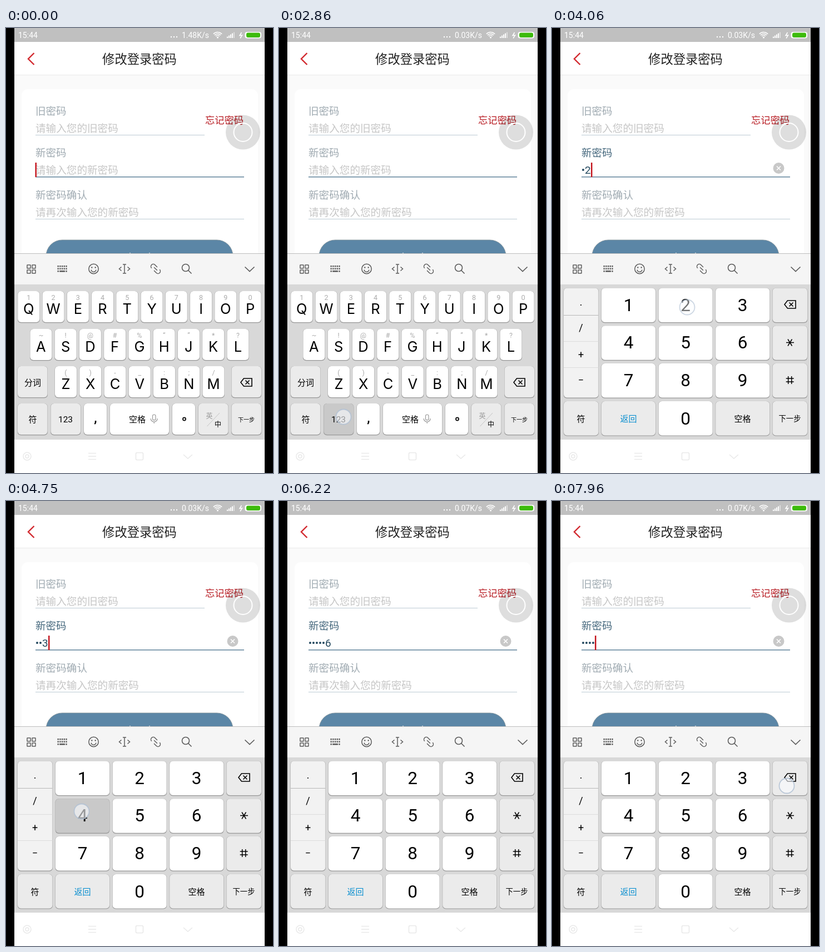
An HTML page with a canvas that plays this animation: 480 by 800 pixels, repeating every 8 s.

```html
<!DOCTYPE html>
<html lang="zh-CN">
<head>
<meta charset="utf-8">
<style>
html, body { margin: 0; width: 100%; height: 100%; overflow: hidden; background: #000; }
canvas { display: block; width: 480px; height: 800px; }
</style>
</head>
<body>
<canvas id="stage" width="480" height="800"></canvas>
<script>
const ctx = document.getElementById('stage').getContext('2d');
const LOOP = 8000;
const FONT = 'Roboto, "Noto Sans CJK SC", sans-serif';
const KEY_FONT = 'Inter, sans-serif';

// Finger taps: the key reacts on release, then the touch dot fades until end.
const TAPS = [
  { key: '123', start: 2740, release: 2935, end: 3090, x: 116, y: 699 },
  { key: '1', start: 3325, release: 3520, end: 3640, x: 141, y: 500 },
  { key: '2', start: 3830, release: 4020, end: 4130, x: 243, y: 502 },
  { key: '3', start: 4370, release: 4560, end: 4660, x: 340, y: 503 },
  { key: '4', start: 4670, release: 4870, end: 4970, x: 136, y: 558 },
  { key: '5', start: 4900, release: 5070, end: 5260, x: 244, y: 576 },
  { key: '6', start: 5590, release: 5720, end: 5880, x: 321, y: 577 },
  { key: 'del', start: 7185, release: 7370, end: 7570, x: 421, y: 508 },
  { key: 'del', start: 7810, release: 7950, end: 8100, x: 422, y: 512 }
];
const PRESS_DELAY = 40, MASK_DELAY = 1505;
const CARET_FLIPS = [430, 930, 1430, 1930, 2430, 2930, 3430, 3520, 4520, 4560,
  5570, 5720, 6220, 6690, 7225, 7370, 7870, 7950];
const GREY = '#ebebeb', DOWN = '#c9c9c9', INK = '#000';

function rect(x, y, w, h, color) {
  ctx.fillStyle = color;
  ctx.fillRect(x, y, w, h);
}

function round(x, y, w, h, r, fill, stroke, width = 1) {
  ctx.beginPath();
  ctx.roundRect(x, y, w, h, r);
  paint(fill, stroke, width);
}

function circle(x, y, r, fill, stroke, width = 1) {
  ctx.beginPath();
  ctx.arc(x, y, r, 0, Math.PI * 2);
  paint(fill, stroke, width);
}

function paint(fill, stroke, width) {
  if (fill) { ctx.fillStyle = fill; ctx.fill(); }
  if (stroke) { ctx.strokeStyle = stroke; ctx.lineWidth = width; ctx.stroke(); }
}

function line(color, width, ...points) {
  ctx.beginPath();
  for (let i = 0; i < points.length; i += 2) ctx.lineTo(points[i], points[i + 1]);
  paint(null, color, width);
}

function arc(x, y, r, from, to, color, width) {
  ctx.beginPath();
  ctx.arc(x, y, r, from * Math.PI, to * Math.PI);
  paint(null, color, width);
}

// Text is placed by the vertical middle of its glyphs.
function text(str, x, cy, size, color, align = 'center', weight = 400, font = FONT) {
  const lift = /[\u4e00-\u9fff]/.test(str) ? 0.38 : 0.355;
  ctx.font = `${weight} ${size}px ${font}`;
  ctx.textAlign = align;
  ctx.fillStyle = color;
  ctx.fillText(str, x, cy + size * lift);
}

function passwordAt(t) {
  let count = 0, last = null;
  for (const tap of TAPS) {
    if (t < tap.release) break;
    if (tap.key === 'del') { count--; last = null; }
    else if (tap.key !== '123') { count++; last = tap; }
  }
  const shown = last && t < last.release + MASK_DELAY ? last.key : '';
  return { count, shown, dots: count - shown.length };
}

function drawStatusBar(t) {
  rect(15, 0, 450, 25, '#c0c0c0');
  text('15:44', 22, 13, 14, '#fff', 'left');
  const speed = t < 1970 ? '1.48' : t < 5950 ? '0.03' : '0.07';
  text(speed + 'K/s', 365, 13, 14, '#fff', 'right');
  for (let i = 0; i < 3; i++) circle(297 + i * 5, 16, 1.2, '#fff');
  circle(380.5, 17, 1.6, '#fff');
  for (const r of [4.5, 7.5, 10.5]) arc(380.5, 18, r, 1.24, 1.76, '#fff', 1.6);
  for (let i = 0; i < 5; i++) {
    const h = 2.5 + i * 2;
    rect(397 + i * 3, 18 - h, 2, h, i < 4 ? '#fff' : '#ddd');
  }
  line('#fff', 1.5, 423.5, 8, 420, 13.5, 424.5, 13, 421, 18.5);
  round(429.5, 7, 29.5, 11.5, 4, '#fff');
  round(432, 8.5, 25, 8.5, 3, '#3dbb0b');
}

function drawForm(t) {
  rect(15, 25, 450, 60, '#fff');
  rect(15, 84, 450, 1, '#e8e8e8');
  rect(15, 85, 450, 320, '#fafafa');
  line('#d2282e', 2.4, 50.5, 45, 40, 55.5, 50.5, 66);
  text('修改登录密码', 240, 56, 22.3, '#222');
  round(28, 110, 425, 310, 11, '#fff');

  const { count, shown, dots } = passwordAt(t);
  const label = '#a0abb2', hint = '#c6c6c6', ink = '#24495f';
  text('旧密码', 53, 148.5, 18.5, label, 'left');
  text('请输入您的旧密码', 53, 180, 18.6, hint, 'left');
  rect(53, 192, 304, 1, '#bccbd4');
  text('忘记密码', 358, 165, 17.3, '#b71a21', 'left');

  text('新密码', 53, 224, 18.5, count ? '#47697e' : label, 'left');
  rect(53, 267, 375, 1.5, '#5f8299');
  if (count) {
    for (let i = 0; i < dots; i++) circle(56 + i * 6, 255, 2, ink);
    text(shown, 53 + dots * 6, 255.5, 19, ink, 'left');
    circle(407.5, 252, 10, '#c8c8c8');
    line('#fff', 1.6, 404, 248.5, 411, 255.5);
    line('#fff', 1.6, 411, 248.5, 404, 255.5);
  } else {
    text('请输入您的新密码', 53, 255, 18.6, hint, 'left');
  }
  const flips = CARET_FLIPS.filter(f => t >= f).length;
  if (flips % 2 === 0) {
    const x = 52.5 + dots * 6 + shown.length * 11 + (count ? 0.5 : 0);
    rect(x, 242, 2.5, 26, '#c4161f');
  }

  text('新密码确认', 53, 299.5, 18.6, label, 'left');
  text('请再次输入您的新密码', 53, 330.5, 18.6, hint, 'left');
  rect(53, 343, 375, 1, '#bccbd4');
  round(72, 381, 336, 60, 29, '#5b86a6', '#8b979b', 0.8);
  rect(222, 404, 2, 1, '#d5e0e8');
  rect(257, 404, 2, 1, '#d5e0e8');

  circle(426, 187.5, 31, 'rgba(0,0,0,0.13)');
  circle(426, 187.5, 16.5, null, '#fff', 2);
}

function drawToolbar() {
  const c = '#5c5c5c';
  rect(15, 405, 450, 56, '#f5f5f5');
  rect(15, 405, 450, 1, '#bdbdbd');
  for (const x of [38, 47]) for (const y of [426, 435]) round(x, y, 6, 6, 0.5, null, c, 1.5);
  for (let i = 0; i < 5; i++) {
    rect(92.5 + i * 3.7, 427, 2.4, 2.6, c);
    rect(92.5 + i * 3.7, 431.5, 2.4, 2.6, c);
  }
  rect(92.5, 436, 2.4, 2.6, c);
  rect(96.2, 436, 9.8, 2.6, c);
  rect(107.3, 436, 2.4, 2.6, c);
  circle(157.5, 433, 8.7, null, c, 1.5);
  circle(154.3, 430.5, 1.2, c);
  circle(160.7, 430.5, 1.2, c);
  arc(157.5, 434, 4.5, 0.05, 0.95, c, 1.4);
  line(c, 1.5, 213, 425, 213, 441);
  line(c, 1.5, 210, 425, 216, 425);
  line(c, 1.5, 210, 441, 216, 441);
  line(c, 1.5, 207.5, 429.5, 203.5, 433, 207.5, 436.5);
  line(c, 1.5, 218.5, 429.5, 222.5, 433, 218.5, 436.5);
  ctx.save();
  ctx.translate(269, 433);
  ctx.rotate(Math.PI / 4);
  line(c, 1.5, -4, 0, 4, 0);
  for (let side = 0; side < 2; side++) {
    ctx.beginPath();
    ctx.arc(-6, 0, 4.2, Math.PI / 2, Math.PI * 1.5);
    ctx.lineTo(0, -4.2);
    paint(null, c, 1.5);
    ctx.rotate(Math.PI);
  }
  ctx.restore();
  circle(323, 431, 6.5, null, c, 1.6);
  line(c, 1.6, 327.5, 435.5, 333.5, 441.5);
  line(c, 1.7, 429.5, 429.5, 438, 437.5, 446.5, 429.5);
}

function key(x, y, w, h, color) {
  round(x - 0.4, y, w + 0.8, h + 1.2, 6, '#989898');
  round(x, y, w, h, 6, color);
}

function backspace(x, y) {
  line(INK, 1.6, x - 10, y, x - 4.5, y - 7, x + 10, y - 7, x + 10, y + 7, x - 4.5, y + 7, x - 10, y, x - 4.5, y - 7);
  line(INK, 1.6, x - 1.5, y - 3.5, x + 5.5, y + 3.5);
  line(INK, 1.6, x + 5.5, y - 3.5, x - 1.5, y + 3.5);
}

function drawLetters(pressed) {
  const rows = [
    [21.3, 473, 'QWERTYUIOP', '1234567890'],
    [43.4, 541, 'ASDFGHJKL', '~!@#%“”*?'],
    [88, 608, 'ZXCVBNM', '()-_:;/']
  ];
  for (const [left, y, letters, hints] of rows) {
    [...letters].forEach((letter, i) => {
      const x = left + i * 44.25;
      key(x, y, 39, 56, '#fff');
      text(hints[i], x + 19.5, y + 12, 12.5, '#ababab');
      text(letter, x + 19.5, y + 32, 25.5, INK, 'center', 400, KEY_FONT);
    });
  }
  key(21, 608, 53.5, 56, GREY);
  text('分词', 48, 637, 15, INK, 'center', 500);
  key(405.5, 608, 53.5, 56, GREY);
  backspace(432, 637);

  const y = 675;
  key(21, y, 53.5, 56, GREY);
  text('符', 48, 703, 15, INK);
  key(80.5, y, 53.5, 56, pressed === '123' ? DOWN : GREY);
  text('123', 107, 703, 15.5, INK);
  key(140, y, 41, 56, '#fff');
  text(',', 161, 700, 24, INK, 'center', 500);
  key(187, y, 106, 56, '#fff');
  text('空格', 236, 703, 15, INK, 'center', 500);
  round(263.5, 695, 5.5, 10, 2.8, null, '#999', 1.2);
  arc(266.2, 702, 6, 0, 1, '#999', 1.2);
  line('#999', 1.2, 266.2, 708, 266.2, 711);
  key(299, y, 41, 56, '#fff');
  circle(320.5, 703, 2.6, null, INK, 1.6);
  key(346, y, 53.5, 56, GREY);
  line('#c4c4c4', 1, 361.5, 716, 384, 692);
  text('英', 365.5, 697, 12, '#999');
  text('中', 381, 712, 12, INK, 'center', 500);
  key(405.5, y, 53.5, 56, GREY);
  text('下一步', 432, 704, 10, INK);
}

function drawDigits(pressed) {
  const rowY = r => 467.5 + r * 67.8, colX = c => 89 + c * 102.6;
  const bottom = rowY(3), midY = bottom + 31;
  key(21, 467.5, 62.5, 197, '#f2f2f2');
  [516, 563, 610].forEach((y, i) => rect(21, y, 62.5, 1, i ? '#dcdcdc' : '#b8b8b8'));
  ['.', '/', '+', '−'].forEach((s, i) => text(s, 52, [493, 539, 587, 633][i], 18, INK));
  for (let n = 1; n <= 9; n++) {
    const x = colX((n - 1) % 3), y = rowY(Math.floor((n - 1) / 3));
    key(x, y, 97, 61.5, pressed === String(n) ? DOWN : '#fff');
    text(String(n), x + 48.5, y + 30, 31.5, INK);
  }
  for (let r = 0; r < 4; r++) key(396.5, rowY(r), 62.5, 61.5, r === 0 && pressed === 'del' ? DOWN : GREY);
  backspace(428, 497);
  line(INK, 1.5, 421, 565.5, 435, 565.5);
  line(INK, 1.5, 424, 559.5, 431.5, 571.5);
  line(INK, 1.5, 431.5, 559.5, 424, 571.5);
  for (const d of [-3, 3]) {
    line(INK, 1.5, 427.7 + d, 626, 427.7 + d, 640);
    line(INK, 1.5, 420.7, 633 + d, 434.7, 633 + d);
  }
  key(21, bottom, 62.5, 61.5, GREY);
  text('符', 52, midY, 15, INK);
  key(colX(0), bottom, 97, 61.5, GREY);
  text('返回', 137.5, midY, 15, '#0a8fd0', 'center', 500);
  key(colX(1), bottom, 97, 61.5, '#fff');
  text('0', 240, midY, 31.5, INK);
  key(colX(2), bottom, 97, 61.5, GREY);
  text('空格', 342.5, midY, 15, INK);
  text('下一步', 427.5, midY, 13.3, INK);
}

function drawNavBar() {
  const c = '#e9e9e9';
  rect(15, 740, 450, 60, '#fff');
  circle(38, 770, 7, null, c, 1.5);
  circle(38, 770, 3, null, c, 1.5);
  for (const y of [764.5, 770, 775.5]) line(c, 1.5, 148, y, 162, y);
  round(233.5, 763.5, 13, 13, 2, null, c, 1.6);
  line(c, 1.6, 319, 767, 327, 774, 335, 767);
}

function drawTouch(t) {
  for (const tap of TAPS) {
    if (t < tap.start || t >= tap.end) continue;
    const fade = (t - tap.release - 20) / (tap.end - tap.release - 20);
    ctx.globalAlpha = 1 - Math.min(1, Math.max(0, fade));
    circle(tap.x, tap.y, 13.5, 'rgba(250,252,255,0.6)', 'rgba(178,193,212,0.85)', 1.8);
    ctx.globalAlpha = 1;
  }
}

function draw(t) {
  rect(0, 0, 480, 800, '#000');
  drawStatusBar(t);
  drawForm(t);
  drawToolbar();
  rect(15, 461, 450, 279, '#d8d8d8');
  const active = TAPS.find(p => t >= p.start + PRESS_DELAY && t < p.release);
  const drawKeys = t < TAPS[0].release ? drawLetters : drawDigits;
  drawKeys(active && active.key);
  drawNavBar();
  drawTouch(t);
}

const began = performance.now();
function tick() {
  draw((performance.now() - began) % LOOP);
  requestAnimationFrame(tick);
}
tick();
</script>
</body>
</html>
```
